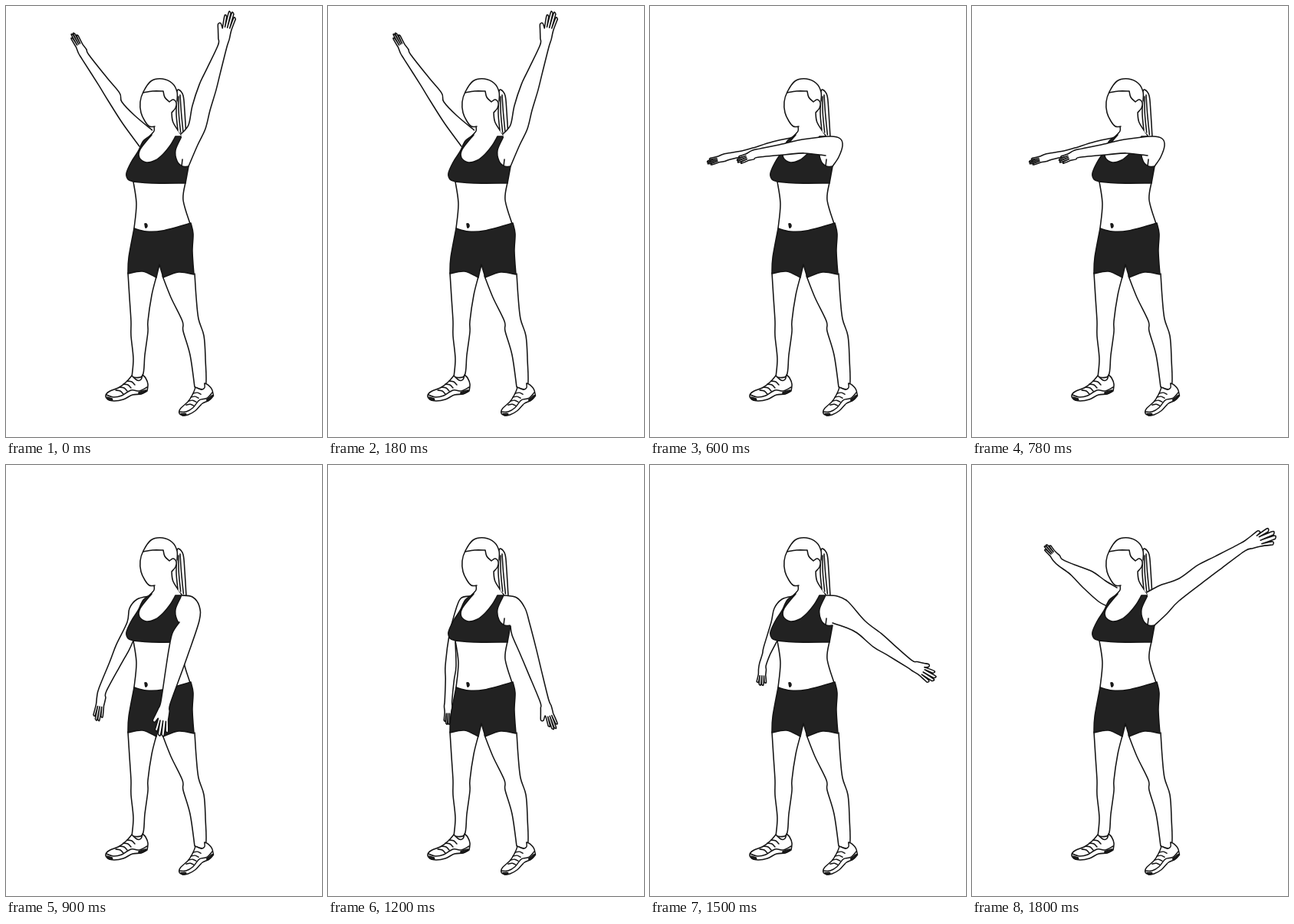
An HTML page for the animation above (2100 ms loop, 412 by 562 pixels).

```html
<!DOCTYPE html>
<html lang="en">
<head>
<meta charset="utf-8">
<title>Arm circles</title>
<style>
  html, body { margin: 0; width: 100%; height: 100%; overflow: hidden; background: #fff; }
  svg { display: block; width: 412px; height: 562px; }
  path { fill: none; stroke: #141414; stroke-width: 1.55; stroke-linecap: round; stroke-linejoin: round; }
  .skin { fill: #fff; }
  .bare { fill: #fff; stroke: none; }
  .dark { fill: #222; }
  .pose { visibility: hidden; animation: show 2100ms step-end infinite; animation-delay: calc(var(--i) * 300ms - 2100ms); }
  @keyframes show {
    0% { visibility: visible; }
    14.28572%, 100% { visibility: hidden; }
  }
</style>
</head>
<body>
<svg viewBox="0 0 412 562">
  <g id="back"></g>
  <g id="body"></g>
  <g id="shoe-left" transform="translate(171 482)"></g>
  <g id="shoe-right" transform="translate(253 495) rotate(-20) scale(.92)"></g>
  <g id="front"></g>
</svg>
<script>
const NS = 'http://www.w3.org/2000/svg';
const byId = id => document.getElementById(id);
const parse = text => text.trim().split(/\s+/).map(s => s.split(',').map(Number));

// Smooth curve through points; "|" marks a sharp corner.
function curve(text) {
  let d = '', last = null;
  for (const part of text.split('|')) {
    const p = parse(part);
    if (last) p.unshift(last);
    else d = 'M' + p[0];
    for (let i = 0; i < p.length - 1; i++) {
      const a = p[i - 1] || p[i], b = p[i], c = p[i + 1], e = p[i + 2] || c;
      const h1 = b.map((v, k) => v + (c[k] - a[k]) / 6);
      const h2 = c.map((v, k) => v - (e[k] - b[k]) / 6);
      d += `C${h1} ${h2} ${c}`;
    }
    last = p[p.length - 1];
  }
  return d;
}

function draw(parent, text, cls = '') {
  const path = document.createElementNS(NS, 'path');
  path.setAttribute('d', curve(text));
  path.setAttribute('class', cls);
  parent.append(path);
}

// Bone coordinates: u is the share of its length, v the pixels to its left.
function bone([x, y], [x2, y2]) {
  const dx = x2 - x, dy = y2 - y, len = Math.hypot(dx, dy);
  return (u, v) => [x + dx * u + dy / len * v, y + dy * u - dx / len * v];
}

// Four fanned fingers, and a thumb on the left (1), the right (-1) or hidden (0).
function hand(wrist, tip, half, fan, thumb) {
  const at = bone(wrist, tip), pad = fan / 4, palm = (half + fan) / 2;
  const side = s => {
    const edge = thumb === s
      ? [at(.2, s * (half + 2)), at(.42, s * (half + 5)), at(.58, s * (half + 7)), at(.62, s * (half + 4)), at(.5, s * palm)]
      : [at(.25, s * (half + .5)), at(.5, s * palm)];
    return (s > 0 ? edge : edge.reverse()).join(' ');
  };
  const fingers = [0, 1, 2, 3].map(i => {
    const v = fan * (1 - i / 1.5), reach = i % 3 ? 1 : .88;
    const top = [at(reach - .04, v + pad), at(reach, v), at(reach - .04, v - pad)].join(' ');
    return i < 3 ? `${top} | ${at(.55, (v - fan / 3) * .8)}` : top;
  });
  return `${side(1)} | ${fingers.join(' | ')} | ${side(-1)}`;
}

// The outline runs out along the left edge, round the hand and back.
function arm(parent, { from, joints, to, girth, fan, thumb = 0 }) {
  const [elbow, wrist, tip] = parse(joints);
  const at = bone(elbow, wrist), half = 3 + girth / 4;
  const out = [at(0, girth), at(.4, girth * .8), at(1, half)].join(' ');
  const home = [at(1, -half), at(.4, -girth * .8), at(0, -girth)].join(' ');
  draw(parent, `${from} ${out} ${hand(wrist, tip, half, fan, thumb)} ${home} ${to}`, 'skin');
}

const backArms = [
  { from: '174,183 152,153', joints: '141,119 104,67 87,36', to: '151,125 168,143 192,163', girth: 9, fan: 4 },
  { from: '169,187 145,171', joints: '129,141 74,95 49,78', to: '160,154 175,159 189,167', girth: 9, fan: 5 },
  { from: '175,190', joints: '135,190 103,196 75,204', to: '160,177 189,171', girth: 5, fan: 3.5 },
  { from: '166,229', joints: '152,238 126,293 119,333', to: '158,205 161,187 171,175 187,171', girth: 9, fan: 5 },
  { from: '166,231', joints: '160,262 157,307 156,338', to: '158,222 165,194 173,174 187,171', girth: 7, fan: 4 },
  { from: '166,229', joints: '154,239 147,260 145,287', to: '158,205 162,187 172,175 187,171', girth: 6, fan: 5 },
  { from: '176,184 165,178 145,160', joints: '134,138 115,127 96,105', to: '157,139 174,151 189,160', girth: 7.5, fan: 4 }
];

const frontArms = [
  { from: '228,167 238,155 243,130', joints: '263,106 282,53 294,8', to: '266,136 260,160 250,181 238,209', girth: 11.5, fan: 6, thumb: 1 },
  { from: '221,171', joints: '211,139 171,85 149,61', to: '241,155 249,168 249,181 238,209', girth: 11.5, fan: 9 },
  { from: '229,195', joints: '200,183 140,192 114,202', to: '235,170 248,173 251,182 246,197 238,209', girth: 9, fan: 4 },
  { from: '229,170 243,172 252,184 252,203', joints: '225,243 208,310 202,353', to: '217,219 226,205', girth: 13, fan: 7, thumb: -1 },
  { from: '229,170 246,173 257,187 263,207', joints: '261,243 282,307 295,344', to: '240,222 238,210', girth: 11, fan: 5, thumb: -1 },
  { from: '229,170 244,171 258,178 280,203', joints: '297,229 338,259 371,279', to: '270,219 253,211 238,206', girth: 10, fan: 7, thumb: 1 },
  { from: '228,166 245,157 270,148', joints: '300,140 353,107 395,91', to: '270,177 254,194 238,209', girth: 11, fan: 9, thumb: 1 }
];

function addPoses(id, arms) {
  arms.forEach((shape, i) => {
    const g = document.createElementNS(NS, 'g');
    g.setAttribute('class', 'pose');
    g.style.setProperty('--i', i);
    byId(id).append(g);
    arm(g, shape);
  });
}

function addShoe(id) {
  const add = (text, cls) => draw(byId(id), text, cls);
  add('-7,0 -13,7 -23,15 -37,21 -41,26 -38,31 -30,33 -18,31 -6,25 5,24 13,20 | 14,11 11,3 7,-1 | 5,5 0,6 -7,0', 'skin');
  add('-40,25 -31,28 -20,26 -8,19 3,20 13,15');
  add('-39,28 -33,30 -33,32 -38,31 -39,28', 'dark');
  add('2,22 11,19 11,21 3,24 2,22', 'dark');
  for (let k = 0; k < 4; k++) {
    const x = -5 * k, y = 4 * k;
    add(`${x - 13},${y + 7} ${x - 7},${y + 8} ${x - 3},${y + 12}`);
  }
}

function addBody() {
  const add = (text, cls) => draw(byId('body'), text, cls);

  // Trunk and neck
  add('193,156 | 189,168 | 172,190 | 158,218 | 166,229 169,255 168,290 | 240,284 | 236,272 230,255 234,230 | 238,209 | 229,169 | 218,152 | 216,138', 'bare');
  add('166,229 170,258 167,290');
  add('234,230 231,253 240,284');
  add('193,157 193,163 187,170');
  add('216,139 218,152 229,169');
  add('230,200 229,209');
  add('181,284 183,284 184,287 182,289 181,284', 'dark');

  // Legs
  add('159,348 161,380 163,411 163,430 166,460 164,484 | 178,482 181,455 185,425 185,411 190,377 196,353', 'skin');
  add('204,352 215,380 230,411 231,424 240,455 246,497 | 260,497 260,460 258,430 251,408 248,380 246,349', 'skin');

  // Shorts and top
  add('167,290 183,294 204,293 241,283 | 244,297 243,320 245,350 | 225,347 205,354 | 200,337 | 196,354 | 178,346 159,349 | 160,328 167,290', 'dark');
  add('190,168 179,176 172,190 163,204 157,218 159,226 166,229 | 190,231 234,231 | 238,209 | 230,209 223,202 221,188 229,170 | 221,170 | 214,182 205,193 195,201 183,204 174,198 175,187 190,168', 'dark');

  // Ponytail
  add('222,113 225,109 231,117 233,138 235,171 | 224,162 222,138 222,113', 'bare');
  add('222,113 225,109 231,117 233,138 235,171');
  for (let k = 0; k < 3; k++) {
    add(`${223 + 2 * k},${120 - 2 * k} ${222 + 3.3 * k},140 ${224 + 3.7 * k},${162 + 3 * k}`);
  }

  // Head, hairline and ear
  add('216,139 | 222,130 223,112 217,101 204,95 189,98 179,112 175,125 176,139 181,150 187,157 194,157', 'bare');
  add('194,157 187,157 181,150 176,139 175,125 179,112 189,98 204,95 217,101 223,112 223,124');
  add('179,113 191,111 205,111 | 207,119 213,125 | 218,122 222,126 221,133 216,139');
}

addBody();
['shoe-left', 'shoe-right'].forEach(addShoe);
addPoses('back', backArms);
addPoses('front', frontArms);
</script>
</body>
</html>
```
